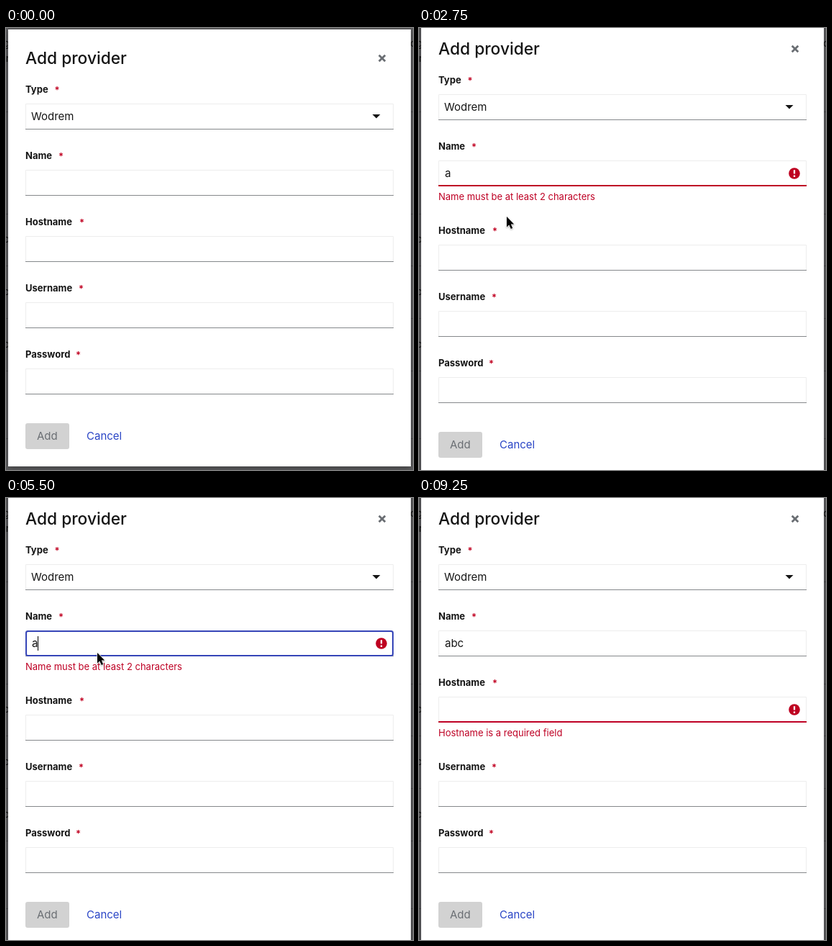
Write an HTML page that moves like this. It is 566 px wide and 614 px high and loops after 9.75 s.

```html
<!DOCTYPE html>
<html lang="en">
<head>
<meta charset="utf-8">
<title>Add provider</title>
<style>
html, body { margin: 0; width: 100%; height: 100%; overflow: hidden; background: #5d5d5f; }
svg { display: block; width: 566px; height: 614px; font: 15px Inter, sans-serif; fill: #151515; }
.page text { font-size: 14px; }
.page path { stroke: #4a4a4c; }
.panel { fill: #fff; filter: drop-shadow(0 3px 4px rgba(0, 0, 0, .3)); }
.title { font-size: 22.75px; font-weight: 500; }
.label { font-size: 13px; font-weight: 700; }
.star { font-size: 13px; font-weight: 600; fill: #c00020; }
.error { font-size: 13px; fill: #be0024; }
.edge { fill: none; stroke: #ededed; }
.base { stroke: #85888b; }
.focus { fill: none; stroke: #3645b8; stroke-width: 2; }
.invalid { stroke: #be0024; stroke-width: 2; }
.badge { fill: #be0020; }
.caret { stroke: #000; }
.muted { fill: #6a6e73; }
.link { fill: #2b46c6; }
.pointer { stroke: #fff; stroke-width: 1.2; paint-order: stroke; stroke-linejoin: round; fill: #000; filter: drop-shadow(0 1px 1px rgba(0, 0, 0, .3)); }
</style>
</head>
<body>
<svg viewBox="0 0 566 614">
  <g class="page">
    <path d="M0 116.5H566M0 258.5H566M0 330.5H566M0 403.5H566M0 476.5H566M0 570.5H566"/>
    <g text-anchor="end">
      <text x="5" y="26">g</text><text x="5" y="47">er</text>
      <text x="5" y="298">ro</text><text x="5" y="371">ro</text><text x="5" y="444">ro</text>
    </g>
    <text x="562" y="26">c</text>
  </g>
  <rect class="panel" id="panel" x="3" y="2" width="560" height="607"/>
  <g id="head">
    <text class="title" x="27" y="50">Add provider</text>
    <path d="M518.7 37.7L527.3 46.3M527.3 37.7L518.7 46.3" stroke="#6a6e73" stroke-width="2.8"/>
  </g>
  <g id="fields"></g>
  <g id="foot">
    <rect x="27" y="549" width="61" height="36" rx="3" fill="#d2d2d2"/>
    <text class="muted" x="43" y="572">Add</text>
    <text class="link" x="112" y="572">Cancel</text>
  </g>
  <path class="pointer" id="pointer" d="M0 0V14.4L3.3 11.4 5.8 17 8.2 16 5.8 10.5H10.2Z"/>
</svg>
<script>
const LOOP = 9750;
const RISE = -13, DROP = 12;
const byId = id => document.getElementById(id);
const show = (el, on) => el.setAttribute('visibility', on ? 'visible' : 'hidden');
const move = (el, x, y) => el.setAttribute('transform', `translate(${x} ${y})`);

function makeField(label, starX, row) {
  const top = 105 + row * 92;
  const group = document.createElementNS('http://www.w3.org/2000/svg', 'g');
  group.innerHTML = `
    <text class="label" x="27" y="${top - 15}">${label}</text>
    <text class="star" x="${starX}" y="${top - 14}">*</text>
    <g transform="translate(0 ${top})">
      <path class="edge" d="M27.5 35V.5H538.5V35"/>
      <path class="base" d="M27 35.5H539"/>
      <path class="invalid" d="M27 35H539"/>
      <rect class="focus" x="28" y="1" width="510" height="34" rx="2.5"/>
      <text class="value" x="36" y="23"></text>
      <path class="caret" d="M.5 8V28"/>
      <g class="alert">
        <circle class="badge" cx="522" cy="18" r="7.8"/>
        <path d="M522 13.2V18.6M522 20.6V23" stroke="#fff" stroke-width="2.3"/>
      </g>
      <text class="error" x="27" y="55"></text>
    </g>`;
  byId('fields').append(group);
  const part = name => group.querySelector('.' + name);
  return {
    group, value: part('value'), caret: part('caret'), focus: part('focus'),
    invalid: part('invalid'), alert: part('alert'), error: part('error')
  };
}

const fields = [['Type', 67.5], ['Name', 73], ['Hostname', 102], ['Username', 101], ['Password', 97]]
  .map(([label, starX], row) => makeField(label, starX, row));
const NAME = 1, HOST = 2;
fields[0].value.textContent = 'Wodrem';
fields[0].value.setAttribute('x', 35);
fields[0].group.insertAdjacentHTML('beforeend', '<path d="M509.5 120H520.5L515 125.5Z"/>');

const SHORT = 'Name must be at least 2 characters';
const EMPTY = 'Name is a required field';
const NO_HOST = 'Hostname is a required field';

// Each step changes only what it lists.
const steps = [
  [0, { at: null, focus: 0, caret: false, name: '', bad: 0, message: '' }],
  [250, { at: [150, 57] }],
  [500, { at: [140, 100] }],
  [750, { at: [130, 165] }],
  [1000, { at: [124, 207] }],
  [1250, { at: [122, 212], focus: NAME, caret: true }],
  [1500, { name: 'a' }],
  [1750, { at: [121, 234] }],
  [2000, { at: [120, 258] }],
  [2250, { at: [120, 270] }],
  [2500, { focus: 0, caret: false, bad: NAME, message: SHORT }],
  [2750, { at: [122, 262] }],
  [3000, { at: [128, 225] }],
  [3250, { at: [130, 211], focus: NAME, caret: true }],
  [3750, { caret: false }],
  [4000, { name: '', message: EMPTY, caret: true }],
  [4250, { at: [129, 245] }],
  [4500, { at: [128, 264], focus: 0, caret: false }],
  [4750, { at: [128, 245] }],
  [5000, { at: [127, 215], focus: NAME, caret: true }],
  [5500, { name: 'a', message: SHORT }],
  [6000, { name: 'abc', bad: 0, message: '' }],
  [6500, { at: [142, 253] }],
  [6750, { at: [162, 299], focus: HOST }],
  [7000, { at: [170, 278] }],
  [7250, { at: [171, 266], focus: 0, caret: false, bad: HOST, message: NO_HOST }],
  [7500, { at: [170, 265] }],
  [7750, { at: [172, 265] }],
  [8000, { at: [175, 264] }],
  [8500, { at: [178, 268] }],
  [8750, { at: [183, 277] }],
  [9000, { at: [184, 280] }],
  [9250, { at: null }]
];

function render(s) {
  const top = s.bad ? RISE : 0, bottom = s.bad ? DROP : 0;
  byId('panel').setAttribute('y', 2 + top);
  byId('panel').setAttribute('height', 607 + bottom - top);
  move(byId('head'), 0, top);
  move(byId('foot'), 0, bottom);
  fields[NAME].value.textContent = s.name;
  fields.forEach((f, i) => {
    const focused = i > 0 && i === s.focus;
    const bad = i > 0 && i === s.bad;
    move(f.group, 0, i <= s.bad ? top : bottom);
    show(f.focus, focused);
    show(f.invalid, bad && !focused);
    show(f.alert, bad);
    show(f.caret, focused && s.caret);
    f.error.textContent = bad ? s.message : '';
    if (focused) {
      const text = f.value.textContent;
      move(f.caret, 36 + (text ? Math.round(f.value.getComputedTextLength()) : 0), 0);
    }
  });
  show(byId('pointer'), s.at);
  if (s.at) move(byId('pointer'), ...s.at);
}

let shown = -1;
function tick() {
  const t = performance.now() % LOOP;
  const past = steps.filter(([start]) => start <= t);
  if (past.length !== shown) {
    shown = past.length;
    render(Object.assign({}, ...past.map(([, change]) => change)));
  }
  requestAnimationFrame(tick);
}
tick();
</script>
</body>
</html>
```
